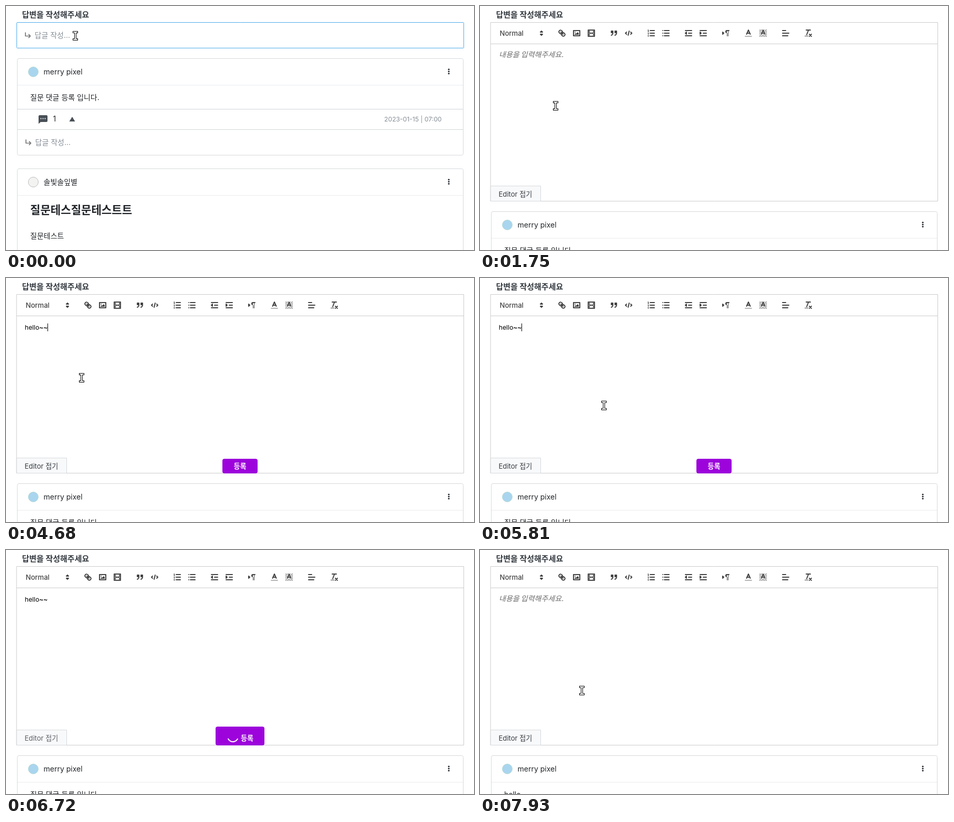
An HTML page with a canvas for the animation above (8 s loop, 891 by 467 pixels).

```html
<!DOCTYPE html>
<html lang="ko">
<head>
<meta charset="utf-8">
<title>답변 작성</title>
<style>
html, body { margin: 0; width: 100%; height: 100%; overflow: hidden; background: #fff; }
canvas { display: block; width: 891px; height: 467px; }
</style>
</head>
<body>
<canvas id="stage" width="891" height="467"></canvas>
<script>
const ctx = document.getElementById('stage').getContext('2d');
const LOOP = 8000;
const FONT = "Inter, 'Noto Sans CJK KR', 'Noto Sans CJK', sans-serif";
const KO = "'Noto Sans CJK KR', 'Noto Sans CJK', sans-serif";
const INK = '#212529', GREY = '#868e96', ICON = '#444';
const PURPLE = '#9c04db';

function text(str, x, y, size, color = INK, style = '400', align = 'left', family = FONT) {
  ctx.font = `${style} ${size}px ${family}`;
  ctx.fillStyle = color;
  ctx.textAlign = align;
  ctx.fillText(str, x, y);
}

function rect(x, y, w, h, color) {
  ctx.fillStyle = color;
  ctx.fillRect(x, y, w, h);
}

function box(x, y, w, h, r, fill, stroke, line = 1) {
  ctx.beginPath();
  ctx.roundRect(x, y, w, h, r);
  if (fill) { ctx.fillStyle = fill; ctx.fill(); }
  if (stroke) { ctx.strokeStyle = stroke; ctx.lineWidth = line; ctx.stroke(); }
}

function disc(x, y, r, fill, stroke) {
  ctx.beginPath();
  ctx.arc(x, y, r, 0, Math.PI * 2);
  ctx.fillStyle = fill;
  ctx.fill();
  if (stroke) { ctx.strokeStyle = stroke; ctx.lineWidth = 1; ctx.stroke(); }
}

function shape(d, fill, stroke, width = 2) {
  const p = new Path2D(d);
  if (stroke) { ctx.strokeStyle = stroke; ctx.lineWidth = width; ctx.stroke(p); }
  if (fill) { ctx.fillStyle = fill; ctx.fill(p); }
}

function at(x, y, draw) {
  ctx.save();
  ctx.translate(x, y);
  draw();
  ctx.restore();
}

// ---- toolbar icons, each in an 18px square ----
const line = (d, w) => shape(d, null, ICON, w);
const solid = d => shape(d, ICON);
const both = d => shape(d, ICON, ICON);
const letterA = () => line('M5.5 11L9 3L12.5 11M11.6 9H6.4');

const icons = {
  108: () => both('M7 11L9 13L11 11ZM7 7L9 5L11 7Z'),
  147: () => {
    line('M7 7L11 11');
    const loop = 'M8.9 4.58a3.48 3.48 0 0 1 .36 4.68A3.48 3.48 0 0 1 4.58 8.9C3.2 7.5 2 6.4 4.2 4.2S7.5 3.2 8.9 4.58Z';
    line(loop);
    at(18, 18, () => { ctx.rotate(Math.PI); line(loop); });
  },
  175: () => {
    line('M3 4H15V14H3Z');
    disc(6, 7, 1, ICON);
    solid('M5 12V11L7 9L8 10L11 7L13 9V12Z');
  },
  203: () => {
    line('M3 3H15V15H3Z');
    solid('M5 3H6V15H5ZM12 3H13V15H12ZM5 8H13V10H5Z');
    for (const y of [5, 7, 10, 12]) solid(`M3 ${y}h3v1h-3ZM12 ${y}h3v1h-3Z`);
  },
  246: () => {
    for (const x of [4, 11]) {
      both(`M${x} 5h3v3h-3Z`);
      line(`M${x + 3} 8c0 4-3 5-3 5`);
    }
  },
  274: () => line('M5 7L3 9L5 11M13 7L15 9L13 11M10 5L8 13'),
  317: () => {
    line('M7 4H15M7 9H15M7 14H15');
    line('M2.5 3L3.5 2.5V5.5M2.5 5.5H4.5M4.5 10.5H2.5C2.5 10.2 4.4 9.4 4.4 8.3A1 1 0 0 0 2.5 8.2M2.5 14.8a1 1 0 0 0 1.8 0A.7.7 0 0 0 3.7 14a.7.7 0 0 0 .6-.7a1 1 0 0 0-1.8-.1', 1);
  },
  345: () => line('M6 4H15M6 9H15M6 14H15M3 4H3.01M3 9H3.01M3 14H3.01'),
  388: () => line('M3 14H15M3 4H15M9 9H15M5 7V11L3 9Z'),
  416: () => { line('M3 14H15M3 4H15M9 9H15'); both('M3 7V11L5 9Z'); },
  459: () => {
    both('M3 11L5 9L3 7Z');
    line('M11 4H15');
    solid('M11 3a3 3 0 0 0 0 6h1V3ZM11 4h1v11h-1ZM13 4h1v11h-1Z');
  },
  502: () => { letterA(); shape('M3 15H15', null, 'rgba(68,68,68,.4)'); },
  530: () => {
    ctx.save();
    ctx.beginPath();
    ctx.rect(2, 2, 14, 14);
    ctx.clip();
    for (let i = 6; i < 32; i += 3) line(`M${i - 16} 16L${i - 2} 2`, 1);
    shape('M5.5 11L9 3L12.5 11M11.6 9H6.4', null, '#fff', 4);
    ctx.restore();
    letterA();
  },
  573: () => line('M3 4H9M3 9H15M3 14H13'),
  616: () => {
    line('M5 3H13M6 12L9.4 3M11 11L15 15M15 11L11 15');
    solid('M2 14h7v1h-7Z');
  }
};

// ---- page parts ----
function replyRow(x, baseline) {
  at(x, baseline - 10, () => shape('M1 0V6.5H10M7.3 3.4L10.4 6.5L7.3 9.6', null, '#777', 1.7));
  text('답글 작성...', x + 18.5, baseline, 14, GREY);
}

function cardHead(y, name, fill, ring) {
  disc(52, y + 26, 9.5, fill, ring);
  text(name, 71.5, y + 31, 14);
  for (let i = 0; i < 3; i++) disc(843, y + 21.3 + i * 4, 1.5, INK);
  rect(22, y + 51, 848, 1, '#e9ecef');
}

function firstCard(y, body) {
  box(21.5, y + .5, 849, 185, 3, '#fff', '#d5d9dd');
  cardHead(y, 'merry pixel', '#a9d5ee', '#b9dcd6');
  text(body, 46, y + 80, 14);
  rect(22, y + 97, 849, 1, '#d0d4d8');
  rect(22, y + 136, 849, 1, '#d0d4d8');
  at(62, y + 109, () => {
    shape('M2 0H15Q17 0 17 2V11Q17 13 15 13H4L0 16.5V2Q0 0 2 0Z', '#495057');
    for (const x of [4.5, 8.5, 12.5]) disc(x, 6.5, 1.1, '#fff');
  });
  text('1', 89.5, y + 121, 14);
  shape(`M120.5 ${y + 121}L126 ${y + 112}L131.5 ${y + 121}Z`, '#495057');
  text('2023-01-15 | 07:00', 829.5, y + 121, 12.15, GREY, '400', 'right');
  replyRow(37, y + 166);
}

function secondCard() {
  box(21.5, 311.5, 849, 220, 3, '#fff', '#d5d9dd');
  cardHead(311, '솔빛솔잎별', '#f3f3f1', '#bdbdbd');
  text('질문테스질문테스트트', 46, 398, 21.1, INK, '700');
  text('질문테스트', 46, 445, 14);
}

function toolbar() {
  text('Normal', 37.5, 57, 13.1, ICON, '500');
  for (const x in icons) at(+x, 43, icons[x]);
}

// ---- timeline ----
const EDIT = 210, SUBMIT = 6370, POSTED = 6790;
const keys = [[2020, 1], [2220, 2], [3080, 3], [3280, 4], [3550, 5], [4480, 6], [4680, 7]];
const caretOff = [[820, 1350], [1750, 2020], [2750, 3080], [4080, 4480], [5210, 5740], [6230, POSTED], [7320, 7520], [7790, LOOP]];

const within = (t, a, b) => t >= a && t < b;

function typed(t) {
  if (t >= POSTED) return '';
  let n = 0;
  for (const [time, count] of keys) if (t >= time) n = count;
  return 'hello~~'.slice(0, n);
}

// Pointer moves in 70 ms ticks, eased from a to b.
function glide(t, start, steps, a, b) {
  const k = Math.min(1, (Math.floor((t - start) / 70) + 1) / steps);
  const e = k * k * (3 - 2 * k);
  return [a[0] + (b[0] - a[0]) * e, a[1] + (b[1] - a[1]) * e];
}

function pointer(t) {
  if (t < EDIT) return ['beam', 132, 57];
  if (t < 610) return ['arrow', 132, 57];
  if (t < 5670) {
    const p = glide(t, 610, 5, [132, 57], [144, 191]);
    return [p[1] < 73 ? 'arrow' : 'beam', ...p];
  }
  if (t < SUBMIT) {
    const p = glide(t, 5670, 8, [144, 191], [436, 360]);
    return [p[1] > 346 ? 'hand' : 'beam', ...p];
  }
  if (t < 6440) return ['hand', 428, 364];
  if (t < 6500) return ['arrow', 388, 408];
  if (t < 7720) return null;
  const p = glide(t, 7650, 4, [184, 415], [194, 269]);
  return [p[1] > 374 ? 'arrow' : 'beam', ...p];
}

const cursors = {
  beam() {
    for (const [pad, color] of [[0, '#000'], [1, '#fff']]) {
      const w = 10 - 2 * pad, h = 4 - 2 * pad;
      rect(-5 + pad, -9 + pad, w, h, color);
      rect(-5 + pad, 5 + pad, w, h, color);
      rect(-2 + pad, -9 + pad, 4 - 2 * pad, 18 - 2 * pad, color);
    }
  },
  arrow() {
    shape('M.5 .5V16.5L4 13.2L6.6 19L9 18L6.4 12.2H11.6Z', '#fff', '#222', 1.2);
  },
  hand() {
    shape('M-1.5 1Q0-1 1.5 1V9Q3 7 4.5 9Q6 8 7 10Q9 9 9 12V17L7 20V23.5H-2V21L-6 14Q-7 11-4.5 11.5L-1.5 14Z', '#fff', '#111', 1.2);
    shape('M1.5 9V13M4.5 9.5V13M7 10.5V13', null, '#111', 1);
  }
};

function submitButton(t) {
  if (t >= SUBMIT) {
    box(399, 338, 93, 36, 4, PURPLE);
    const mid = Math.PI / 2 + (t - 6720) / 1000 * Math.PI * 2;
    ctx.beginPath();
    ctx.arc(432, 357, 10, mid - 1.1, mid + 1.1);
    ctx.strokeStyle = '#fff';
    ctx.lineWidth = 2;
    ctx.stroke();
    text('등록', 459, 365, 13.1, '#fff', '700', 'center');
    return;
  }
  box(412, 346, 67, 28, 4, PURPLE);
  if (t >= 6300) box(411, 345, 69, 30, 5, null, '#86d3e6', 2);
  text('등록', 445.5, 365, 13.1, '#fff', '700', 'center');
}

function editor(t) {
  box(20.5, 31.5, 851, 342, 0, '#fff', '#ccc');
  rect(20, 72, 852, 1, '#ccc');
  toolbar();
  const value = typed(t);
  if (value) text(value, 35.7, 99, 12.2, '#000');
  else text('내용을 입력해주세요.', 36, 98, 14, 'rgba(0,0,0,.58)', 'italic 300', 'left', KO);
  if (!caretOff.some(([a, b]) => within(t, a, b))) {
    ctx.font = `400 12.2px ${FONT}`;
    rect(36 + Math.round(ctx.measureText(value).width - .4), 87, 1, 15, '#000');
  }
  const busy = within(t, SUBMIT, POSTED);
  box(20.5, 344.5, 95, 29, 0, '#f8f9fa', '#d5d9dd');
  text('Editor 접기', 35.5, 365, 13.1, busy ? '#5c5f66' : '#343a40');
  if (value) submitButton(t);
}

function render(t) {
  rect(0, 0, 891, 467, '#fff');
  ctx.lineCap = ctx.lineJoin = 'round';
  text('답변을 작성해주세요', 30.5, 22, 15, '#343a40', '700');
  if (t < EDIT) {
    box(20.5, 31.5, 851, 49, 1, '#fff', '#4dabe9');
    replyRow(36, 61);
    firstCard(100, '질문 댓글 등록 입니다.');
    secondCard();
  } else {
    editor(t);
    firstCard(393, t < POSTED ? '질문 댓글 등록 입니다.' : 'hello~~');
  }
  if (within(t, 140, 280)) disc(132, 59, 12, 'rgba(255,210,60,.6)');
  if (within(t, 6300, SUBMIT)) disc(436, 362, 12, 'rgba(255,210,60,.6)');
  const p = pointer(t);
  if (p) at(Math.round(p[1]), Math.round(p[2]), cursors[p[0]]);
}

const start = performance.now();
function tick() {
  render((performance.now() - start) % LOOP);
  requestAnimationFrame(tick);
}
tick();
</script>
</body>
</html>
```
